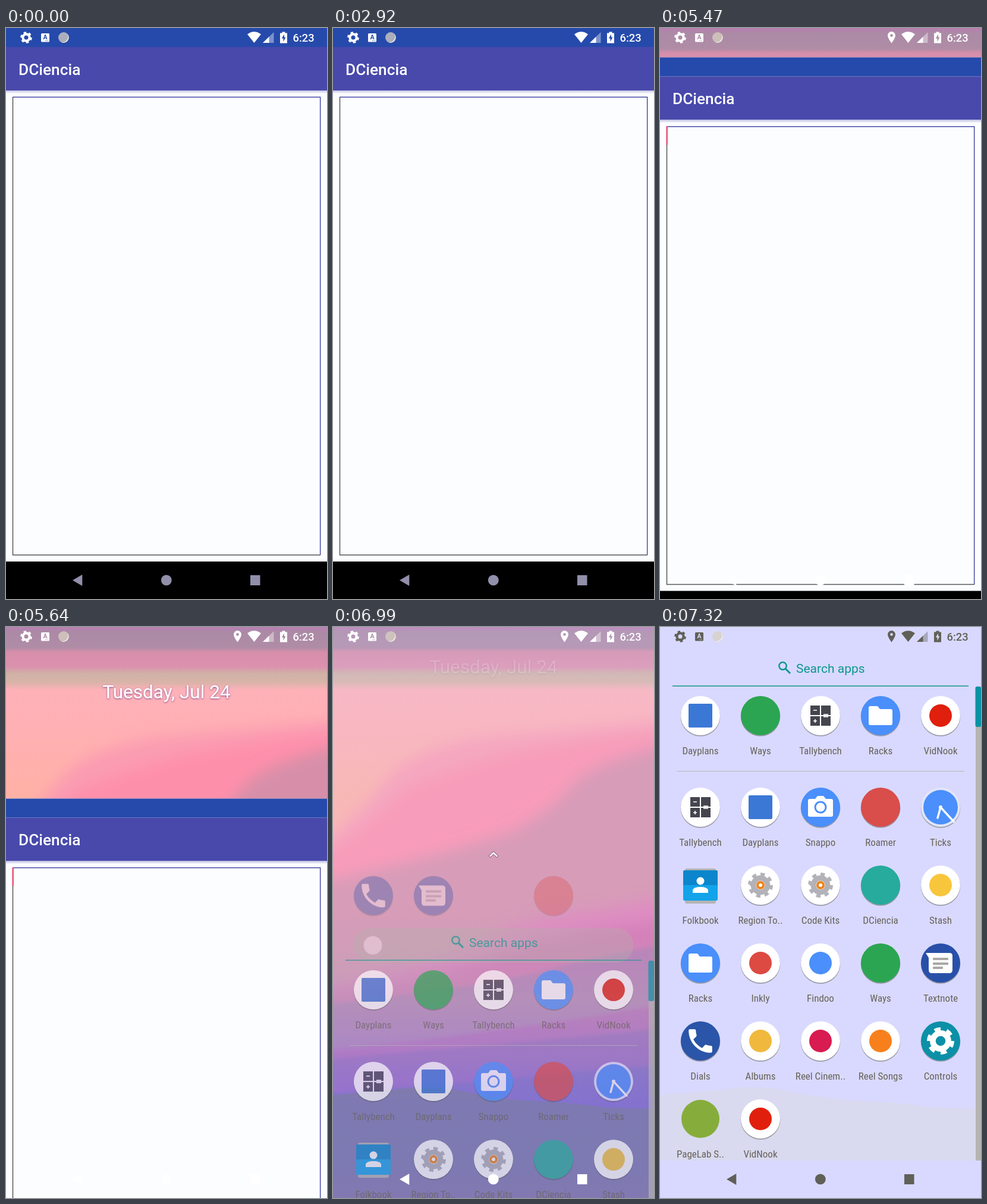
An HTML page for the animation above (8000 ms loop, 540x960 px).

```html
<!DOCTYPE html>
<html lang="en">
<head>
<meta charset="utf-8">
<style>
  html, body { margin: 0; width: 100%; height: 100%; overflow: hidden; background: #000; }
  svg { display: block; width: 540px; height: 960px; }
  text { font-family: Roboto, sans-serif; }
  .label { font-family: "Roboto Condensed", Roboto, sans-serif; font-stretch: 75%; font-size: 17px; text-anchor: middle; fill: #666258; }
</style>
</head>
<body>
<svg id="stage" viewBox="0 0 540 960" xmlns="http://www.w3.org/2000/svg">
  <defs>
    <linearGradient id="haze" x1="0" y1="0" x2="0" y2="280" gradientUnits="userSpaceOnUse">
      <stop offset="0" stop-color="#b97fb2"/>
      <stop offset=".03" stop-color="#ab8aa6"/>
      <stop offset=".125" stop-color="#b08ca6"/>
      <stop offset=".15" stop-color="#d68eaa"/>
      <stop offset=".24" stop-color="#dc92ae"/>
      <stop offset=".28" stop-color="#cfb2a6"/>
      <stop offset=".33" stop-color="#d8b3a8"/>
      <stop offset=".38" stop-color="#feb1b8"/>
      <stop offset=".6" stop-color="#ffb0b4"/>
      <stop offset="1" stop-color="#ffb1a6"/>
    </linearGradient>
    <linearGradient id="ground" x1="0" y1="770" x2="0" y2="960" gradientUnits="userSpaceOnUse">
      <stop offset="0" stop-color="#494853"/>
      <stop offset=".75" stop-color="#484855"/>
      <stop offset="1" stop-color="#554754"/>
    </linearGradient>
    <linearGradient id="shadow" x1="0" y1="105" x2="0" y2="110" gradientUnits="userSpaceOnUse">
      <stop offset="0" stop-color="#c6c6e2"/>
      <stop offset=".5" stop-color="#dcdcf2"/>
      <stop offset="1" stop-color="#fcfdff"/>
    </linearGradient>
    <linearGradient id="dim" x1="0" y1="460" x2="0" y2="800" gradientUnits="userSpaceOnUse">
      <stop offset="0" stop-color="#c090a8" stop-opacity="0"/>
      <stop offset=".5" stop-color="#a894aa" stop-opacity=".6"/>
      <stop offset="1" stop-color="#7a6ee0" stop-opacity=".6"/>
    </linearGradient>
    <filter id="soft" x="-10%" y="-10%" width="120%" height="120%"><feGaussianBlur stdDeviation="12"/></filter>
    <filter id="crisp" x="-10%" y="-10%" width="120%" height="120%"><feGaussianBlur stdDeviation="3"/></filter>
    <filter id="glow" x="-10%" y="-30%" width="120%" height="160%">
      <feDropShadow dx="0" dy="1" stdDeviation="1.6" flood-color="#6a2f86" flood-opacity=".85"/>
    </filter>
  </defs>

  <g id="sky"></g>
  <rect id="dusk" width="540" height="960" fill="url(#dim)"/>
  <rect id="veil" width="540" height="960" fill="#d9d9ff"/>
  <path id="hill" fill="#d9d9f0"/>

  <text id="date" x="270" y="119.500" font-size="31.5" text-anchor="middle" fill="#fff" filter="url(#glow)">Tuesday, Jul 24</text>
  <g id="dock"></g>
  <g id="arrow" fill="none" stroke-linecap="square">
    <path d="M264.5 719l5.5-5.5 5.5 5.5" stroke="#6b4560" stroke-width="4.5" opacity=".6"/>
    <path d="M264.5 719l5.5-5.5 5.5 5.5" stroke="#fff" stroke-width="2.4"/>
  </g>

  <g id="drawer">
    <g fill="none" stroke="#0b9690">
      <circle cx="206.500" cy="65.500" r="6.200" stroke-width="2.400"/>
      <path d="M211 70l8 8" stroke-width="3"/>
      <path d="M21 99.200H519" stroke-width="1.600"/>
    </g>
    <text x="229" y="76.500" font-size="21" fill="#0b9690">Search apps</text>
    <path d="M28 242.500H512" stroke="#b9b7b8"/>
    <rect x="531" y="104" width="9" height="793" fill="#b6b4b2"/>
    <rect x="530.500" y="100" width="9.500" height="68" rx="3" fill="#0a93a4"/>
    <g id="grid"></g>
  </g>
  <rect id="tray" y="897" width="540" height="63" fill="#d9d9ff"/>

  <g id="app">
    <rect width="540" height="960" fill="#fcfdff"/>
    <rect width="540" height="32" fill="#264aab"/>
    <rect y="32" width="540" height="73" fill="#4849ab"/>
    <rect y="105" width="540" height="5" fill="url(#shadow)"/>
    <text x="21" y="78.500" font-size="26.250" font-weight="500" fill="#fff">DCiencia</text>
    <g fill="none" stroke-width="1.500">
      <path d="M11.500 116V886H529" stroke="#575757"/>
      <path d="M11 116.300H528.700V886" stroke="#4c4ca6"/>
    </g>
    <rect id="caret" x="10.500" y="115.500" width="2.500" height="31.500" fill="#f4547c"/>
    <rect y="897" width="540" height="63" fill="#000"/>
  </g>

  <g id="status" fill="currentColor">
    <g id="cog" transform="translate(34 16)"></g>
    <rect x="59" y="9" width="14" height="14.500" rx="1.500"/>
    <g id="inset">
      <text x="66" y="19" font-size="10.500" font-weight="700" text-anchor="middle">A</text>
      <path d="M66 21.300h5" stroke="currentColor" stroke-width="1.200" stroke-dasharray="1.200 .8" opacity=".7"/>
    </g>
    <circle cx="97" cy="16" r="9" fill="#d8d0c0" opacity=".75"/>
    <path d="M103 9.500a9 9 0 0 1-11 14a9.500 9.500 0 0 0 11-14z" fill="#fff" opacity=".8"/>
    <path id="pin" fill-rule="evenodd" d="M389.500 6a6.500 6.500 0 0 1 6.500 6.500c0 4.500-6.500 13-6.500 13s-6.500-8.500-6.500-13a6.500 6.500 0 0 1 6.500-6.500zm0 4.200a2.300 2.300 0 1 0 .01 0z"/>
    <path d="M406 10.500Q417.500 2 429 10.500L417.500 25z"/>
    <path d="M432 25L450.500 7V25z" opacity=".4"/>
    <path d="M432 25L442.500 14.800V25z"/>
    <path fill-rule="evenodd" d="M464.500 8.500V6.500h5v2H473V25.500H461V8.500zM468 10.500L463.800 17.500h2.700v5.500l4-7.500h-2.500z"/>
    <text x="482.500" y="23" font-size="18.400" font-weight="500">6:23</text>
  </g>
  <g id="keys">
    <path d="M112 928.500L128.300 919V938z"/>
    <circle cx="269.800" cy="928.400" r="8.900"/>
    <rect x="411" y="920" width="16.500" height="17"/>
  </g>
</svg>

<script>
const $ = id => document.getElementById(id);
const LOOP = 8000, EXIT = [5351, 5880], OPEN = [6888, 7320], TRAVEL = 795;
const BLINKS = [430, 930, 1430, 1930, 2430, 2920, 3460, 3950, 4440, 4940, 5440];
const RIDGE = "M0 787Q70 781 140 774Q185 772 220 781Q280 794 340 797Q400 799 460 808L540 810V960H0z";

const disc = (fill, r = 33) => `<circle r="${r}" fill="${fill}"/>`;
const shade = `<circle cy="1.500" r="33.300" fill="#3c3c28" opacity=".4"/>`;
const tile = (fill, art = "") => shade + disc(fill) + art;
const dot = fill => tile("#fff", disc(fill, 19));
const box = (x, y, w, h, fill, rx = 0) =>
  `<rect x="${x}" y="${y}" width="${w}" height="${h}" rx="${rx}" fill="${fill}"/>`;

function gear(r, color, teeth) {
  const ring = (k, w, dash) => `<circle r="${r * k}" fill="none" stroke="${color}" stroke-width="${r * w}" ${dash}/>`;
  return ring(.57, .42, "") + ring(.86, .28, `pathLength="${teeth * 2}" stroke-dasharray="1 1"`);
}

const handset = tile("#2a55a8", `<path fill="#fff" transform="scale(2.200) translate(-12 -12)" d="M6.600 10.800c1.400 2.800 3.800 5.100 6.600 6.600l2.200-2.200c.3-.3.7-.4 1-.2 1.100.4 2.300.6 3.600.6.600 0 1 .4 1 1V20c0 .6-.4 1-1 1C10.600 21 3 13.400 3 4c0-.6.4-1 1-1h3.500c.6 0 1 .4 1 1 0 1.200.2 2.400.6 3.600.1.300 0 .7-.3 1z"/>`);
const bubble = tile("#2850a8", `<path fill="#fff" d="M-25-17H15q5 0 5 5V11q0 6-5 6H-15q-5 0-5-6V-9z"/>`
  + [[-9, 26], [-1, 26], [6, 17]].map(([y, w]) => box(-13, y, w, 4, "#a9a9a6", 1)).join(""));
const folder = tile("#4a8ffb", `<path fill="#fff" d="M-17-16H-5l4 5H17q3 0 3 3V13q0 3-3 3H-17q-3 0-3-3V-13q0-3 3-3z"/>`);
const lens = tile("#4a8ffb", `<path fill="#fff" d="M-18-14H-9l4-5H5l4 5H18q3 0 3 3V13q0 3-3 3H-18q-3 0-3-3V-11q0-3 3-3z"/>`
  + disc("#4a8ffb", 10.500) + disc("#fff", 7.500));
const dial = tile("#e2e5fa", disc("#4a8ffb", 29)
  + `<path d="M0 0L-5 18M0 0L22 24" stroke="#fff" stroke-width="3.400" stroke-linecap="round"/>` + disc("#fff", 3));
const sums = tile("#fff", [-17, 1].map(x => box(x, -17, 16, 16, "#45454f") + box(x, 1, 16, 16, "#45454f")).join("")
  + `<path d="M-12-9h6M-12 9h6M-9 6v6M5-2h8M5 2h8" stroke="#fff" stroke-width="1.700"/>`);
const planner = tile("#fff", box(-20, -20, 40, 40, "#3b78d6", 2));
const people = box(-26, -28, 52, 59, "#b4b4b4", 3) + box(-29, -25, 58, 28, "#0b86cc", 2) + box(-29, 0, 58, 26, "#12a3ea", 2)
  + `<circle cy="-7" r="6.500" fill="#fff"/><path fill="#fff" d="M-13 13V8Q-11 3 0 3T13 8V13z"/>`;
const works = tile("#fff", gear(21, "#b2b2b8", 8) + disc("#f08218", 7) + disc("#fff", 3));
const knobs = tile("#0b90a8", gear(23, "#fff", 6));
const route = tile("#2ba552"), globe = tile("#d94d4a"), robot = tile("#27ab9c");

const apps = [
  [planner, "Dayplans"], [route, "Ways"], [sums, "Tallybench"], [folder, "Racks"], [dot("#e0200c"), "VidNook"],
  [sums, "Tallybench"], [planner, "Dayplans"], [lens, "Snappo"], [globe, "Roamer"], [dial, "Ticks"],
  [people, "Folkbook"], [works, "Region To.."], [works, "Code Kits"], [robot, "DCiencia"], [dot("#f8c63c"), "Stash"],
  [folder, "Racks"], [dot("#dd4a42"), "Inkly"], [dot("#4a8ffb"), "Findoo"], [route, "Ways"], [bubble, "Textnote"],
  [handset, "Dials"], [dot("#f0b83c"), "Albums"], [dot("#d81b50"), "Reel Cinem.."], [dot("#f8801c"), "Reel Songs"], [knobs, "Controls"],
  [disc("#86ad3c", 32), "PageLab S.."], [dot("#e0200c"), "VidNook"]
];
const at = (x, y, art) => `<g transform="translate(${x} ${y})">${art}</g>`;
const col = i => 68 + 101 * i;

$("grid").innerHTML = apps.map(([art, name], i) => {
  const row = Math.floor(i / 5), y = row ? 172 + 131 * row : 149;
  return at(col(i % 5), y, art + `<text class="label" y="65">${name}</text>`);
}).join("");

$("dock").innerHTML = at(col(0), 785.500, handset) + at(col(1), 785.500, bubble) + at(col(3), 785.500, globe)
  + box(34, 840, 471.500, 58.500, "#b3b3a9", 29) + at(67, 869, disc("#fff", 15.500));

$("cog").innerHTML = gear(9.800, "currentColor", 6);
$("hill").setAttribute("d", RIDGE);

// Each band runs from its upper edge to below the stage.
const bands = [
  ["#fb9cb2", "soft", "-40 375L0 350Q60 295 100 245Q150 200 260 184Q400 172 580 156"],
  ["#fe8fab", "soft", "-40 395L0 375Q80 320 120 275Q220 235 300 215Q400 195 580 175"],
  ["#d78fa9", "soft", "-40 438L0 425Q180 385 300 345Q370 310 410 258Q450 225 580 195"],
  ["#e27ab6", "soft", "-40 612L0 602Q180 565 270 520Q330 488 420 480Q490 472 580 450"],
  ["#d968aa", "soft", "-40 622L0 615Q190 590 290 545Q390 515 580 490"],
  ["#b16bab", "crisp", "-40 636L0 633Q200 612 340 582Q430 555 580 530"],
  ["#bb4bac", "crisp", "-40 716L0 711Q200 690 400 660Q480 648 580 630"],
  ["#9146a9", "crisp", "-40 730L0 726Q200 708 400 690Q480 684 580 670"],
  ["#6a48a8", "crisp", "-40 790L0 784Q200 768 300 758Q420 745 580 735"]
];
$("sky").innerHTML = `<rect width="540" height="960" fill="url(#haze)"/>`
  + bands.map(([c, f, d]) => `<path fill="${c}" filter="url(#${f})" d="M${d}V1000H-40z"/>`).join("")
  + `<path fill="url(#ground)" d="${RIDGE}"/>`;

const clamp = v => Math.max(0, Math.min(1, v));
const part = (t, [a, b]) => clamp((t - a) / (b - a));
const mix = (a, b, k) => `rgb(${a.map((v, i) => Math.round(v + (b[i] - v) * k))})`;
const shift = (id, y) => $(id).setAttribute("transform", `translate(0 ${y.toFixed(2)})`);
const fade = (id, a) => $(id).setAttribute("opacity", a.toFixed(3));
const show = (id, on) => $(id).setAttribute("visibility", on ? "visible" : "hidden");

const WHITE = [255, 255, 255], DARK = [96, 96, 88], MUTED = [146, 143, 171];
const MAUVE = [172, 139, 166], LILAC = [217, 217, 255];

function draw(t) {
  show("caret", BLINKS.filter(b => t >= b).length % 2);
  shift("app", 960 * part(t, EXIT) ** 2);
  show("app", t < EXIT[1]);

  const p = 1 - (1 - part(t, OPEN)) ** 2;
  const reveal = clamp(p * 1.6), dark = clamp((p - .6) / .35);
  fade("dusk", 2 * Math.min(p, 1 - p));
  fade("veil", p ** 2);
  fade("hill", p ** 3);
  fade("tray", dark);
  shift("date", -100 * p);
  fade("date", clamp(1 - 2 * p));
  shift("dock", -TRAVEL * p);
  fade("dock", 1 - reveal);
  shift("arrow", -TRAVEL * p);
  shift("drawer", TRAVEL * (1 - p));
  fade("drawer", reveal);

  const home = t >= EXIT[0];
  show("pin", home);
  $("status").style.color = mix(WHITE, DARK, dark);
  $("inset").style.color = $("inset").style.fill = home ? mix(MAUVE, LILAC, dark) : "#264aab";
  const lit = part(t, [EXIT[0], EXIT[0] + 120]);
  $("keys").setAttribute("fill", dark ? mix(WHITE, DARK, dark) : mix(MUTED, WHITE, lit));
}

const start = performance.now();
function tick() {
  draw((performance.now() - start) % LOOP);
  requestAnimationFrame(tick);
}
tick();
</script>
</body>
</html>
```
